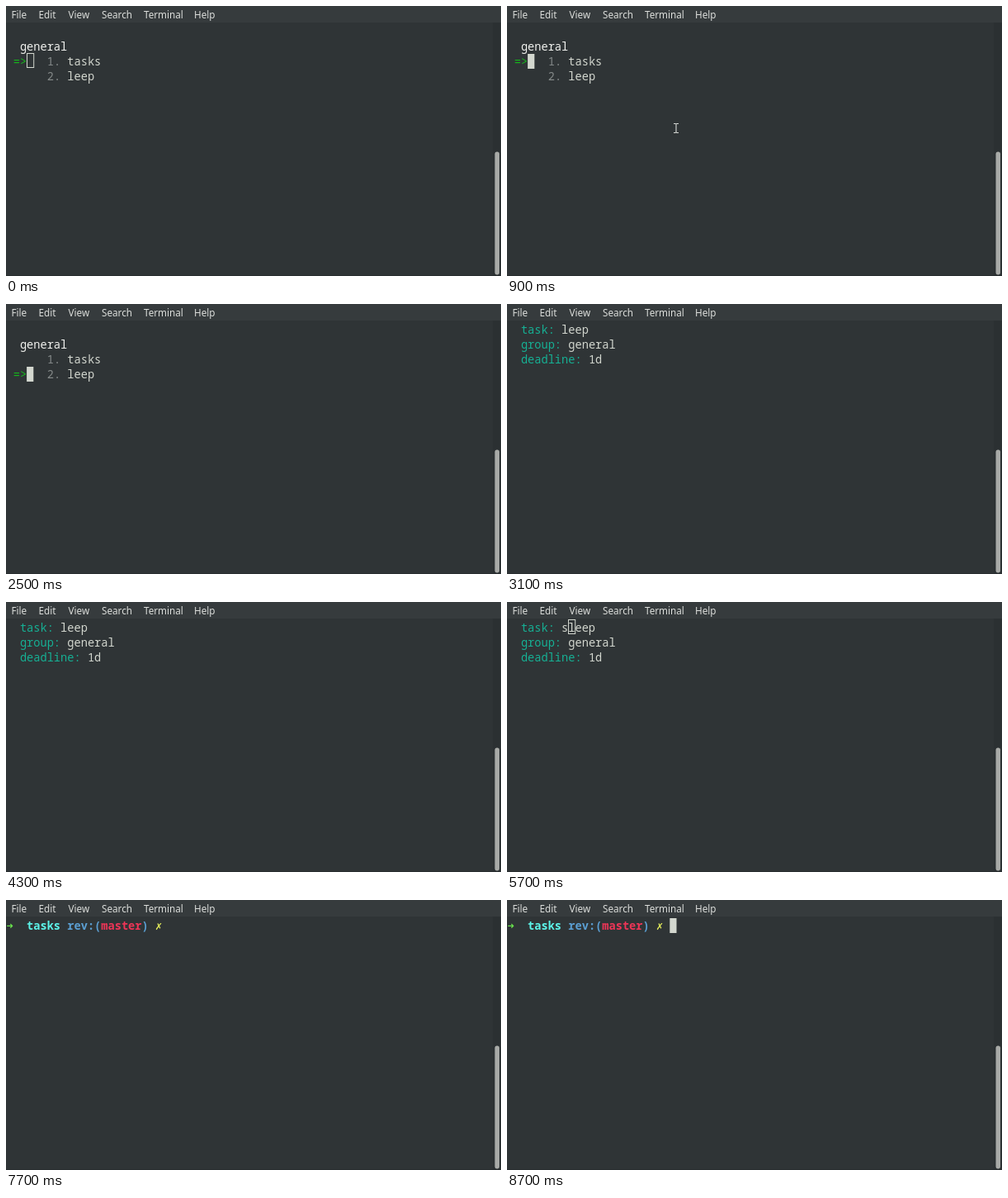
Animation, 600 px wide and 327 px high, one loop 8900 ms. Source, as an HTML page:

```html
<!DOCTYPE html>
<html lang="en">
<head>
<meta charset="utf-8">
<title>Terminal task list</title>
<style>
  html, body { margin: 0; width: 100%; height: 100%; overflow: hidden; background: #2f3436; }
  svg { display: block; width: 600px; height: 327px; }
  text { white-space: pre; }
  .menu { font: 11.7px "Noto Sans", "Open Sans", sans-serif; fill: #dcdedb; }
  .cell { font: 13.667px "Noto Sans Mono", "DejaVu Sans Mono", monospace; }
  .bold { font-weight: 700; }
  .sign { font-family: "DejaVu Sans Mono", monospace; }
</style>
</head>
<body>
<svg id="stage" viewBox="0 0 600 327"></svg>
<script>
const LOOP = 8900, CELL = 8.2, ROW = 18, LEFT = 0.5, TOP = 22;
const BG = '#2f3436', FG = '#d3d7cf', WHITE = '#f1f2ef', GREY = '#858a8a',
      GREEN = '#16b71c', TEAL = '#16b094';

const stage = document.getElementById('stage');

function add(parent, tag, attrs, content = '') {
  const el = document.createElementNS('http://www.w3.org/2000/svg', tag);
  for (const key in attrs) el.setAttribute(key, attrs[key]);
  el.textContent = content;
  parent.append(el);
  return el;
}

const rect = (x, y, width, height, fill, rx = 0) =>
  add(stage, 'rect', { x, y, width, height, fill, rx });
const colX = col => LEFT + col * CELL;
const rowY = row => TOP + row * ROW;
const write = (parent, col, row, str, fill, extra = '') =>
  add(parent, 'text', { x: colX(col), y: rowY(row) + 14, fill, class: 'cell ' + extra }, str);

// Window chrome
rect(0, 0, 600, 327, BG);
rect(0, 0, 600, 20, '#363b3d');
rect(590, 20, 10, 307, '#2b3032');
rect(592.5, 176.5, 5.5, 149, '#a8aaa7', 2.75);
rect(0, 326, 600, 1, '#292e30');
[['File', 6.5], ['Edit', 39.5], ['View', 75.5], ['Search', 116], ['Terminal', 167], ['Help', 228]]
  .forEach(([label, x]) => add(stage, 'text', { x, y: 14.5, class: 'menu' }, label));

// Screens
const screens = {};
const screen = name => screens[name] = add(stage, 'g', {});

function listScreen(name, selected) {
  const g = screen(name);
  write(g, 2, 1, 'general', WHITE);
  ['tasks', 'leep'].forEach((task, i) => {
    write(g, 6, i + 2, i + 1 + '.', GREY);
    write(g, 9, i + 2, task, FG);
  });
  write(g, 1, selected + 1, '=>', GREEN);
}

function editScreen(name, task) {
  const g = screen(name);
  [['task:', task], ['group:', 'general'], ['deadline:', '1d']].forEach(([label, value], row) => {
    write(g, 2, row, label, TEAL);
    write(g, label.length + 3, row, value, FG);
  });
}

function promptScreen(name) {
  const g = screen(name);
  write(g, 0, 0, '➜', '#69e34d', 'sign bold');
  write(g, 3, 0, 'tasks', '#5cf3e8', 'bold');
  write(g, 9, 0, 'rev:(', '#5b9fd3', 'bold');
  write(g, 14, 0, 'master', '#ee3557', 'bold');
  write(g, 20, 0, ')', '#5b9fd3', 'bold');
  write(g, 22, 0, '✗', '#e6ee5b', 'sign bold');
}

listScreen('first', 1);
listScreen('second', 2);
editScreen('edit', 'leep');
editScreen('fixed', 'sleep');
promptScreen('prompt');

// Text cursor and mouse pointer
const block = rect(0, 0, CELL, ROW, FG);
const letter = add(stage, 'text', { class: 'cell', fill: BG });
const hollow = add(stage, 'rect', { width: CELL, height: ROW - 1, fill: 'none', stroke: FG });
const pointer = add(stage, 'path', {
  d: 'M-3-5.5H-1L0-5L1-5.5H3M0-5V5M-3 5.5H-1L0 5L1 5.5H3',
  fill: 'none', stroke: '#d6d9d5', 'stroke-width': 1.1
});

// Cursor cell per screen: column, row, letter underneath
const spots = {
  first: [3, 2, ''], second: [3, 3, ''], edit: [8, 0, 'l'], fixed: [9, 0, 'l'], prompt: [24, 0, '']
};

// Start time, screen, cursor look, pointer place
const A = [205, 148], B = [309, 141];
const steps = [
  [0, 'first', 'hollow'],
  [100, 'first', 'solid', A],
  [300, 'first', 'off', A],
  [900, 'first', 'solid', A],
  [1500, 'first', 'off', A],
  [1700, 'second', 'solid'],
  [2300, 'second', 'off'],
  [2500, 'second', 'solid'],
  [2600, 'edit', 'solid'],
  [3100, 'edit', 'off'],
  [3700, 'edit', 'solid'],
  [4300, 'edit', 'off'],
  [4400, 'fixed', 'solid'],
  [4800, 'fixed', 'hollow'],
  [5900, 'fixed', 'hollow', B],
  [6000, 'fixed', 'solid', B],
  [6600, 'fixed', 'off', B],
  [7100, 'prompt', 'solid'],
  [7700, 'prompt', 'off'],
  [8300, 'prompt', 'solid']
];

const show = (el, on) => el.setAttribute('visibility', on ? 'visible' : 'hidden');
const place = (el, x, y) => { el.setAttribute('x', x); el.setAttribute('y', y); };

function draw([, name, look, mouse]) {
  for (const key in screens) show(screens[key], key === name);
  const [col, row, char] = spots[name], x = colX(col), y = rowY(row);
  place(block, x, y);
  place(hollow, Math.round(x) + 0.5, y - 0.5);
  place(letter, x, y + 14);
  letter.textContent = char;
  show(block, look === 'solid');
  show(letter, look === 'solid');
  show(hollow, look === 'hollow');
  show(pointer, mouse);
  if (mouse) pointer.setAttribute('transform', `translate(${mouse})`);
}

let current;
const start = performance.now();
function tick() {
  const t = (performance.now() - start) % LOOP;
  const step = steps.findLast(s => s[0] <= t);
  if (step !== current) draw(current = step);
  requestAnimationFrame(tick);
}
tick();
</script>
</body>
</html>
```
